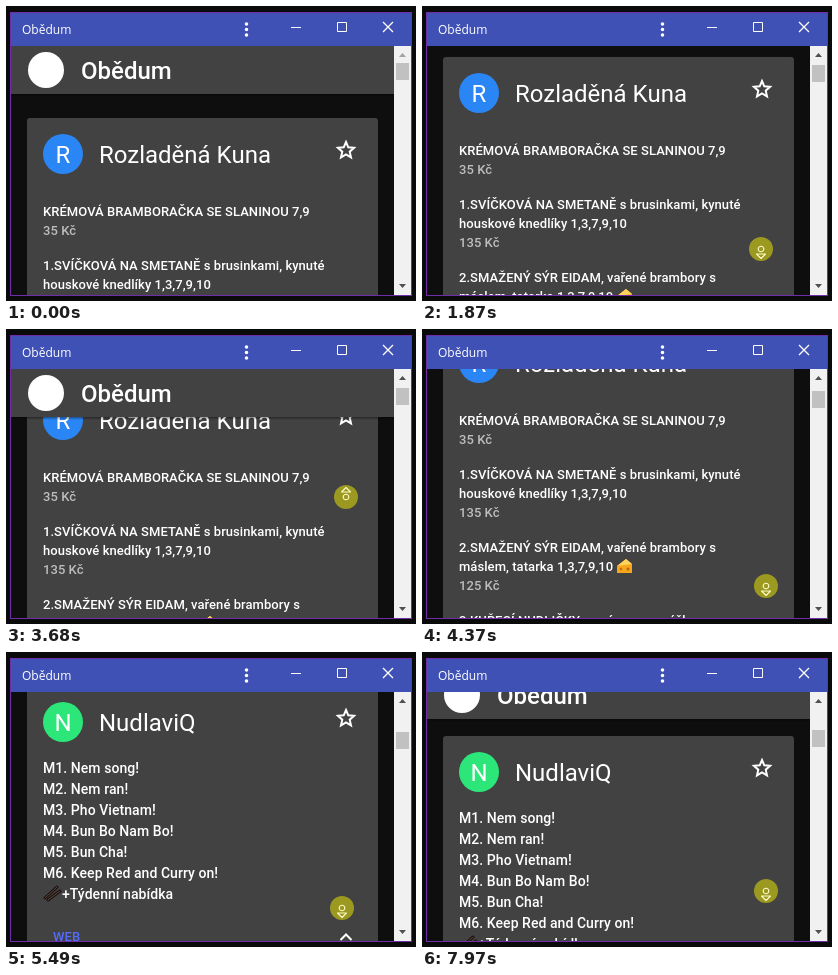
Write an HTML page that moves like this. It is 410x295 px and loops after 8000 ms.

```html
<!DOCTYPE html>
<html lang="cs">
<head>
<meta charset="utf-8">
<title>Obědum</title>
<style>
  html, body { margin: 0; width: 100%; height: 100%; overflow: hidden; background: #0a0a0a; }
  svg { display: block; width: 410px; height: 295px; font-family: Roboto, sans-serif; fill: #fff; }
  .bar { font: 500 12px "Open Sans", "Noto Sans", sans-serif; }
  .big { font-size: 24px; }
  .app { font-size: 24px; font-weight: 500; }
  .item { font-size: 13px; font-weight: 500; letter-spacing: .05px; }
  .row { font-size: 14px; font-weight: 500; letter-spacing: .05px; }
  .price { fill: #bdbdbd; }
  .link { fill: #536dfe; }
  .line { fill: none; stroke: #fff; }
  .mid { text-anchor: middle; }
</style>
</head>
<body>
<svg viewBox="0 0 410 295">
  <defs>
    <clipPath id="view"><rect x="5" y="40" width="383" height="249"/></clipPath>
    <linearGradient id="shade" x2="0" y2="1">
      <stop stop-color="#000" stop-opacity=".4"/>
      <stop offset="1" stop-color="#000" stop-opacity="0"/>
    </linearGradient>
  </defs>

  <rect width="410" height="295" fill="#0a0a0a"/>
  <rect x="4.5" y="6.5" width="401" height="283" fill="#0e0e0e" stroke="#6f2da8"/>

  <g clip-path="url(#view)">
    <g id="page"></g>
    <g id="head">
      <rect id="shadow" x="5" y="88" width="383" height="3" fill="url(#shade)"/>
      <rect x="5" y="40" width="383" height="48" fill="#424242"/>
      <circle cx="40" cy="64" r="18"/>
      <text class="app" x="75" y="73">Obědum</text>
    </g>
  </g>

  <rect x="5" y="7" width="400" height="33" fill="#3f51b5"/>
  <text class="bar" x="16" y="28">Obědum</text>
  <path class="line" stroke-width="3.6" stroke-linecap="round" stroke-dasharray="0 5.5" d="M240.500 18v11.500"/>
  <path class="line" d="M285 21.500h10M331.500 16.500h9v9h-9z"/>
  <path class="line" stroke-width="1.3" d="M377 16l10 10M387 16l-10 10"/>

  <rect x="388" y="40" width="17" height="249" fill="#f1f1f1"/>
  <path id="top" d="M393 51l3.500-4 3.500 4z"/>
  <path d="M393 278l3.500 4 3.500-4z" fill="#505050"/>
  <rect id="thumb" x="390" width="13" height="17" fill="#c1c1c1"/>

  <g id="cursor">
    <circle r="12" fill="#f5f000" fill-opacity=".5"/>
    <path id="arrow" d="M0 0v16l4-3.500 2.500 6 2.500-1-2.500-6h5z" stroke="#000" stroke-width=".8"/>
    <g class="line" style="stroke:#fdfbc8" stroke-width="1.1" stroke-linejoin="round">
      <circle id="dot" r="2.8"/>
      <path id="down" d="M-4.500 5h9L0 9.500z"/>
      <path id="up" d="M-4.500-5h9L0-9.500z"/>
    </g>
  </g>
</svg>

<script>
const LOOP = 8000, HEAD = 48, ORIGIN = 203, ENTER = 160, REST = 480, PAN = 770;
const $ = id => document.getElementById(id);

// Monotone cubic through [time, value] points
function curve(pts) {
  const slope = i => (pts[i + 1][1] - pts[i][1]) / (pts[i + 1][0] - pts[i][0]);
  const last = pts.length - 1;
  const tan = pts.map((p, i) => {
    if (i === 0) return 0;
    if (i === last) return slope(i - 1);
    const a = slope(i - 1), b = slope(i);
    return a * b > 0 ? 2 * a * b / (a + b) : 0;
  });
  return t => {
    if (t <= pts[0][0]) return pts[0][1];
    if (t >= pts[last][0]) return pts[last][1];
    let i = 0;
    while (t >= pts[i + 1][0]) i++;
    const [t0, a] = pts[i], [t1, b] = pts[i + 1];
    const d = t1 - t0, u = (t - t0) / d, w = 1 - u;
    return a * w * w * (1 + 2 * u) + b * u * u * (3 - 2 * u)
      + d * u * w * (tan[i] * w - tan[i + 1] * u);
  };
}

// Turning points of the scroll and a few places it passes
const stops = [
  [830, 0], [1870, 61], [3000, 124], [3740, 56], [4370, 114], [5490, 583],
  [6260, 648], [6410, 648], [6870, 619], [7640, 512], [7970, 533], [8100, 537]
];
const scrollAt = curve(stops);
const cursorX = curve([
  [ENTER, 386], [REST, 345], [3000, 337], [4370, 344], [5490, 336], [6870, 338], [LOOP, 344]
]);

// Autoscroll: the further the pointer is from its origin, the faster the page
function pull(t) {
  const w = 60, v = (scrollAt(t + w) - scrollAt(t - w)) / (2 * w);
  return Math.sign(v) * 92 * Math.abs(v) ** 0.3;
}

// The header slides away going down and comes back going up
function hiddenAt(t, s) {
  let prev = 0, hidden = 0;
  const step = v => {
    hidden = Math.min(HEAD, Math.max(0, hidden + v - prev));
    prev = v;
  };
  for (const [time, v] of stops) if (time < t) step(v);
  step(s);
  return hidden;
}

const text = (cls, x, y, str) => `<text class="${cls}" x="${x}" y="${y}">${str}</text>`;

function star(x, y) {
  const pts = Array.from({ length: 10 }, (_, i) => {
    const r = i % 2 ? 3.9 : 8.5, a = Math.PI * (i / 5 - 0.5);
    return [x + r * Math.cos(a), y + r * Math.sin(a)].map(n => n.toFixed(2));
  });
  return `<polygon class="line" stroke-width="2" points="${pts.join(" ")}"/>`;
}

function card(top, height, color, name, body) {
  const end = top + height;
  return `<rect x="21" y="${top}" width="351" height="${height}" rx="3" fill="#424242"/>
    <circle cx="57" cy="${top + 36}" r="20" fill="${color}"/>`
    + text("big mid", 57, top + 45, name[0])
    + text("big", 93, top + 45, name)
    + star(340, top + 32.5)
    + body
    + text("item link", 47, end - 28, "WEB")
    + `<path class="line" stroke-width="2" d="M334.500 ${end - 29}l5.500-5.500 5.500 5.500"/>`;
}

const dishes = [
  ["KRÉMOVÁ BRAMBORAČKA SE SLANINOU 7,9", "35 Kč"],
  ["1.SVÍČKOVÁ NA SMETANĚ s brusinkami, kynuté", "houskové knedlíky 1,3,7,9,10", "135 Kč"],
  ["2.SMAŽENÝ SÝR EIDAM, vařené brambory s", "máslem, tatarka 1,3,7,9,10", "125 Kč"],
  ["3.KUŘECÍ NUDLIČKY se sýrovou omáčkou a", "smetanou, dušená rýže 1,7,9", "129 Kč"],
  ["4.HOVĚZÍ GULÁŠ s cibulí, domácí", "bramboráčky 1,3,7", "139 Kč"]
];
let y = 210;
const menu = dishes.map(lines => {
  const out = lines.map((str, i) =>
    text(i === lines.length - 1 ? "item price" : "item", 37, y + 19 * i, str)).join("");
  y += 19 * lines.length + 16;
  return out;
}).join("");

const cheese = `<g transform="translate(195 344)">
  <path d="M0 7L9 0l6 5v9H0z" fill="#f5a61d"/><path d="M0 7L9 0l6 5z" fill="#ffd45c"/>
  <g fill="#b96b0c"><circle cx="4" cy="10" r="1.2"/><circle cx="11" cy="10" r="1.5"/></g></g>`;

const rows = ["M1. Nem song!", "M2. Nem ran!", "M3. Pho Vietnam!", "M4. Bun Bo Nam Bo!",
  "M5. Bun Cha!", "M6. Keep Red and Curry on!"]
  .map((str, i) => text("row", 37, 704 + 21 * i, str)).join("")
  + text("row", 56, 830, "+Týdenní nabídka");
const sticks = `<g class="line" stroke-linecap="round">
  <path d="M39 829l12-11M42 831l12-9" style="stroke:#16100e" stroke-width="3"/>
  <path d="M39 829l12-11M42 831l12-9" style="stroke:#6b4a3c"/></g>`;

$("page").innerHTML =
  card(112, 481, "#2a85f5", "Rozladěná Kuna", menu + cheese)
  + card(617, 283, "#2ce67a", "NudlaviQ", rows + sticks)
  + card(924, 283, "#f5a623", "Talířek", "");

const move = (el, x, y) => el.setAttribute("transform", `translate(${x} ${y})`);
const show = (el, on) => el.setAttribute("visibility", on ? "visible" : "hidden");

function draw(t) {
  const s = Math.round(scrollAt(t)), hidden = hiddenAt(t, s);
  move($("page"), 0, -s);
  move($("head"), 0, -hidden);
  show($("shadow"), hidden < HEAD);
  $("thumb").setAttribute("y", Math.round(57 + s / 25));
  $("top").setAttribute("fill", s ? "#505050" : "#a3a3a3");

  const dist = pull(t), rise = 7 * Math.max(0, (REST - t) / (REST - ENTER));
  const seen = t >= ENTER, pan = t >= PAN;
  move($("cursor"), Math.round(cursorX(t)), Math.round(ORIGIN + dist - rise));
  show($("cursor"), seen);
  show($("arrow"), seen && !pan);
  show($("dot"), pan);
  show($("down"), pan && dist > -15);
  show($("up"), pan && dist < 15);
}

const start = performance.now();
function tick() {
  draw((performance.now() - start) % LOOP);
  requestAnimationFrame(tick);
}
draw(0);
requestAnimationFrame(tick);
</script>
</body>
</html>
```
